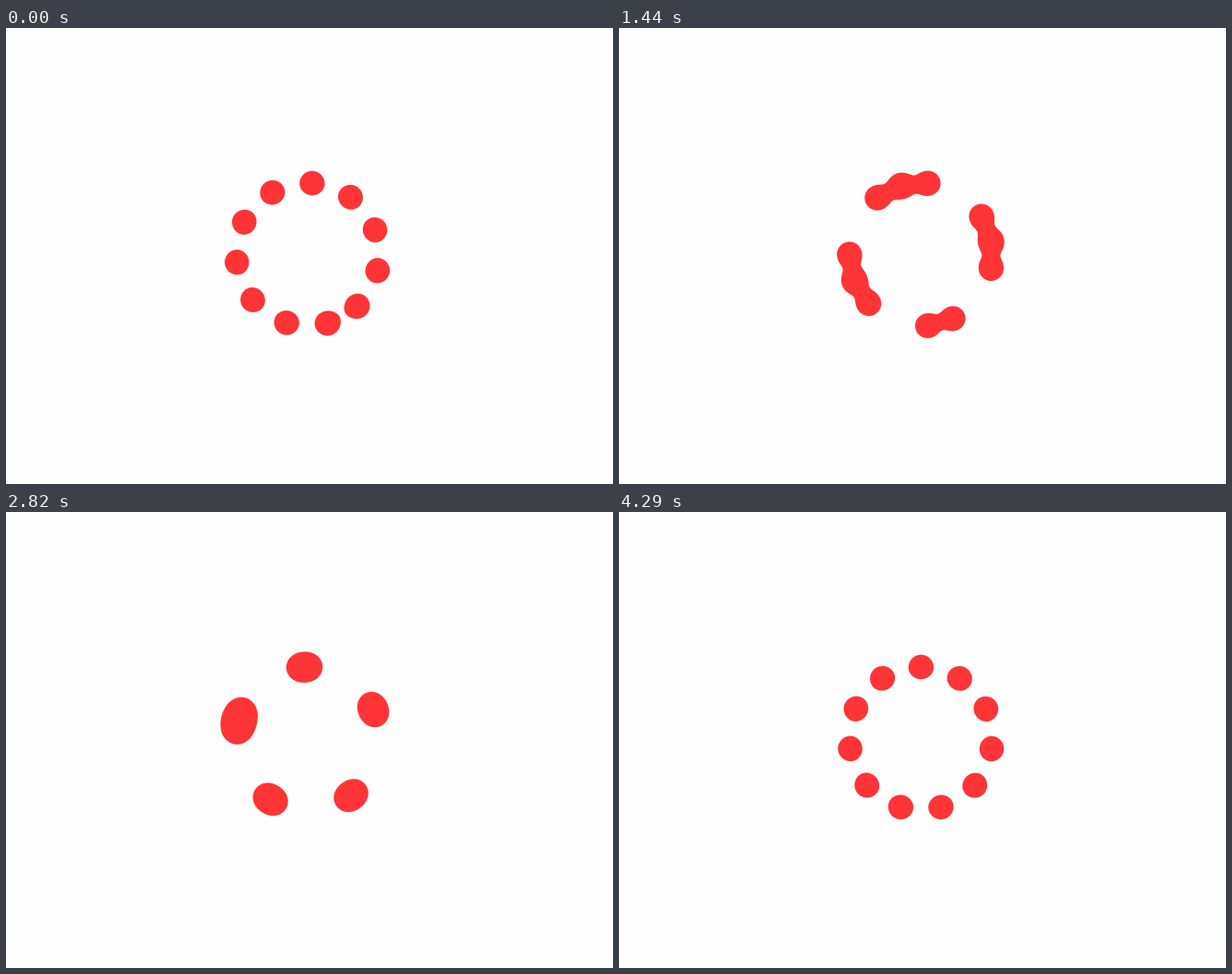
These frames come from a looping animation (658 by 494 pixels, 4320 ms). An HTML page with a canvas:

```html
<!DOCTYPE html>
<html lang="en">
<head>
<meta charset="utf-8">
<title>Metaball ring loader</title>
<style>
  html, body { margin: 0; width: 100%; height: 100%; overflow: hidden; background: #fefefe; }
  canvas { display: block; }
</style>
</head>
<body>
<canvas id="stage" width="658" height="494"></canvas>
<script>
const ctx = document.getElementById('stage').getContext('2d');
const LOOP = 4320, STEP = 30;
const DOTS = 11, CX = 327.3, CY = 245.4, RING = 77.8, BASE = 131;
const STRENGTH = 11.7 * 11.7;
const RED = [255, 52, 55], PAPER = 254;
const BOX = { x: 215, y: 133, size: 225 };

// Angle between neighbouring dots: [step, degrees, degrees per step]
const SPREAD = [
  [0, 33.2, 0.45], [23, 53.8, 1.35], [48, 95.5, 1.35], [82, 132.95, 1.1],
  [105, 157.17, 1.1], [118, 173.75, 1.42], [126, 184.8, 1.25], [143, 196.36, 0.1]
];

function spreadAt(step) {
  let i = 0;
  while (i < SPREAD.length - 2 && step > SPREAD[i + 1][0]) i++;
  const [t0, a, va] = SPREAD[i], [t1, b, vb] = SPREAD[i + 1];
  const d = t1 - t0, u = (step - t0) / d, u2 = u * u, u3 = u2 * u;
  return a + (b - a) * (3 * u2 - 2 * u3)
    + d * va * (u - 2 * u2 + u3) + d * vb * (u3 - u2);
}

function dotsAt(step) {
  const spread = spreadAt(step);
  return Array.from({ length: DOTS }, (_, i) => {
    const a = (BASE + (i + 1) * spread) * Math.PI / 180;
    return [CX + RING * Math.sin(a), CY - RING * Math.cos(a)];
  });
}

// Coverage of the summed inverse-square field, softened over one pixel
function coverage(x, y, dots) {
  let f = 0, gx = 0, gy = 0;
  for (const [px, py] of dots) {
    const dx = x - px, dy = y - py;
    const d2 = Math.max(dx * dx + dy * dy, 1);
    const v = STRENGTH / d2;
    f += v;
    gx += v * dx / d2;
    gy += v * dy / d2;
  }
  if (f > 2.5) return 1;
  const slope = Math.max(2 * Math.hypot(gx, gy), 0.02);
  return Math.min(1, Math.max(0, 0.5 + (f - 1) / slope));
}

const image = ctx.createImageData(BOX.size, BOX.size);

function draw(step) {
  const dots = dotsAt(step), px = image.data;
  let k = 0;
  for (let y = 0; y < BOX.size; y++) {
    for (let x = 0; x < BOX.size; x++) {
      const c = coverage(BOX.x + x + 0.5, BOX.y + y + 0.5, dots);
      for (const channel of RED) px[k++] = PAPER + (channel - PAPER) * c;
      px[k++] = 255;
    }
  }
  ctx.putImageData(image, BOX.x, BOX.y);
}

const start = performance.now();
let shown = -1;

function tick() {
  const step = Math.floor((performance.now() - start) % LOOP / STEP);
  if (step !== shown) draw(shown = step);
  requestAnimationFrame(tick);
}

ctx.fillStyle = `rgb(${PAPER}, ${PAPER}, ${PAPER})`;
ctx.fillRect(0, 0, 658, 494);
tick();
</script>
</body>
</html>
```
